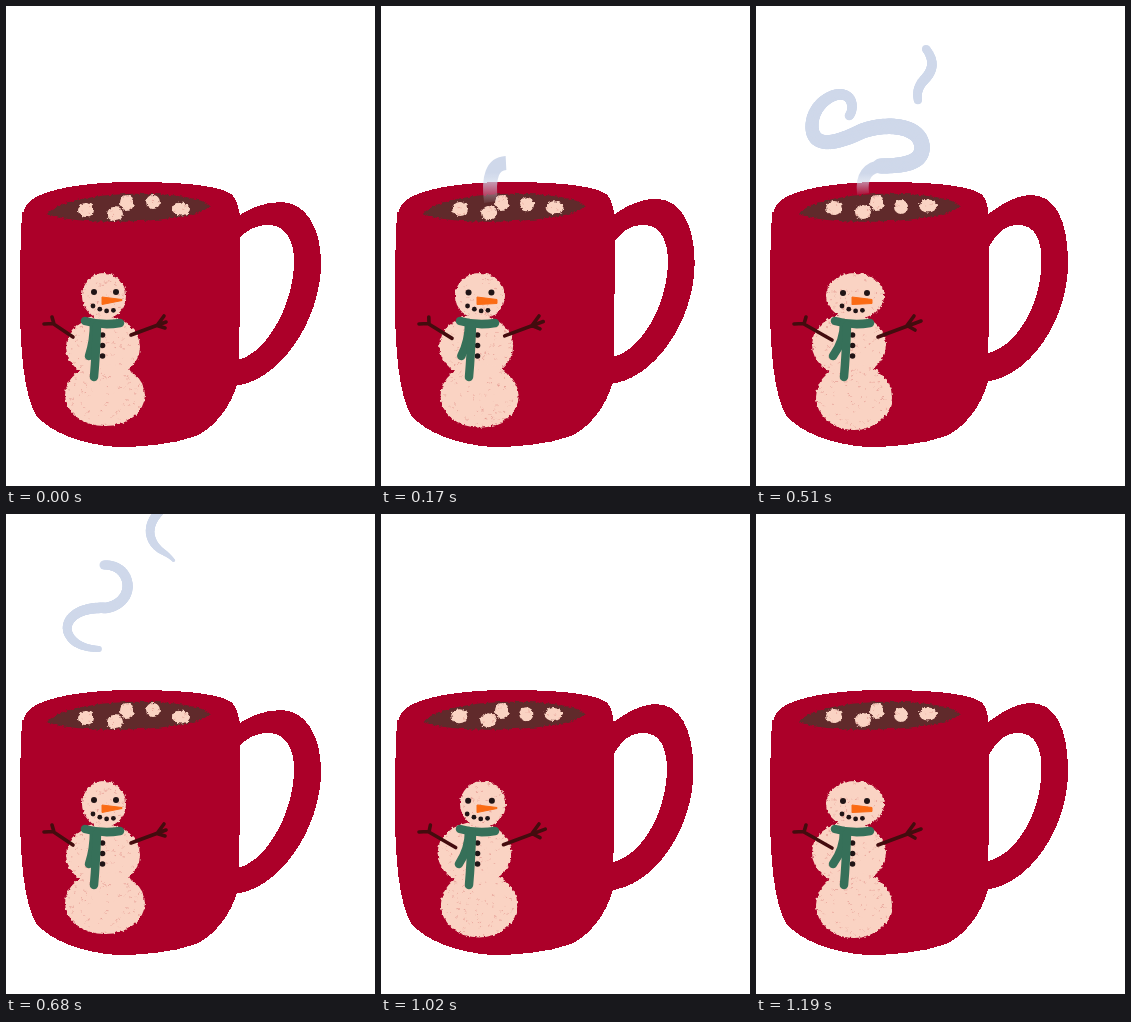
Write an HTML page that moves like this. It is 369 by 480 pixels and loops after 1360 ms.

```html
<!DOCTYPE html>
<html lang="en">
<head>
<meta charset="utf-8">
<title>Hot cocoa</title>
<style>
html, body { margin: 0; height: 100%; overflow: hidden; background: #fff; }
svg { display: block; width: 100vw; height: 100vh; }
.pose, .steam { opacity: 0; animation: pose 680ms step-end infinite; }
.steam { animation: steam 1360ms step-end infinite; }
@keyframes pose { 0% { opacity: 1 } 25%, 100% { opacity: 0 } }
@keyframes steam { 0% { opacity: 1 } 12.5%, 100% { opacity: 0 } }
.mug { fill: #ac0029; shape-rendering: crispEdges; }
.puff { fill: #cfd8ea; }
.base { fill: none; stroke: url(#fade); }
.cocoa { fill: #602a2b; }
.chalk { filter: url(#rough); }
.snow { fill: #fad3c3; }
.fleck { fill: none; stroke: #df8d85; stroke-linecap: round; opacity: .6; }
.coal { fill: #201416; }
.nose { fill: #fb6b14; stroke: #fb6b14; stroke-linejoin: round; }
.scarf { fill: none; stroke: #367059; stroke-width: 8.5; stroke-linecap: round; }
.twig { fill: none; stroke: #430c0e; stroke-width: 3.6; stroke-linecap: round; }
</style>
</head>
<body>
<svg viewBox="0 0 369 480">
  <defs>
    <linearGradient id="fade" x1="0" y1=".25" x2="0" y2="1">
      <stop offset="0" stop-color="#cfd8ea"/>
      <stop offset="1" stop-color="#cfd8ea" stop-opacity=".1"/>
    </linearGradient>
    <filter id="rough" color-interpolation-filters="sRGB">
      <feTurbulence type="fractalNoise" baseFrequency=".3" numOctaves="2" seed="4"/>
      <feDisplacementMap in="SourceGraphic" scale="4" xChannelSelector="R" yChannelSelector="G"/>
      <feGaussianBlur stdDeviation=".4"/>
    </filter>
  </defs>
  <g id="stage"></g>
</svg>
<script>
const STEP = 170;

// sway: how far the drawing leans from its resting pose
const poses = [
  { sway: 0, headX: 98, headR: 22, blunt: 1 },
  { sway: .45, headX: 99, headR: 25, blunt: 4 },
  { sway: .85, headX: 102, headR: 23, blunt: 1 },
  { sway: 1, headX: 99, headR: 29, blunt: 4 }
];

// Resting place, drift and radii
const mallows = [
  { x: 80, y: 204, dx: -2, dy: -2, rx: 8, ry: 7 },
  { x: 109, y: 208, dx: -2, dy: -2, rx: 8, ry: 7 },
  { x: 121, y: 197, dx: 0, dy: 0, rx: 7, ry: 8 },
  { x: 147, y: 196, dx: -2, dy: 5, rx: 7, ry: 7 },
  { x: 175, y: 203, dx: -3, dy: -3, rx: 9, ry: 6.5 }
];

const path = (cls, d, extra = '') => `<path class="${cls}" d="${d}" ${extra}/>`;
const oval = (cls, x, y, rx, ry = rx) =>
  `<ellipse class="${cls}" cx="${x}" cy="${y}" rx="${rx}" ry="${ry}"/>`;
const group = (cls, html, delay = 0) =>
  `<g class="${cls}" style="animation-delay:${delay}ms">${html}</g>`;

let seed = 11;
const rnd = () => (seed = seed * 16807 % 2147483647) / 2147483647;

function snowball(x, y, rx, ry) {
  let d = '';
  for (let i = 0; i < rx * ry / 18; i++) {
    const a = rnd() * Math.PI * 2, r = Math.sqrt(rnd()) * .95;
    d += `M${x + rx * r * Math.cos(a)} ${y + ry * r * Math.sin(a)}l${rnd() * 1.6} ${rnd() - .5}`;
  }
  return oval('snow', x, y, rx, ry) + path('fleck', d);
}

function mug(k) {
  const right = 234.5 - 1.5 * k, reach = 315 - 3 * k, hole = 288 - 2.5 * k;
  const top = 196 - 7 * k, low = 380 - 4 * k, end = 355 - 7 * k;
  const handle = `M226 ${216 - 3 * k}C238 203 258 ${top} 275 ${top}
    C299 ${top} ${reach} ${top + 25} ${reach} 257C${reach} 315 272 ${low - 2} 226 ${low}
    V${end}C258 ${end - 2} ${hole} 300 ${hole} 255
    C${hole} 236 280 219 263 219C252 219 240 222 226 ${240 + 15 * k}Z`;
  const body = `M18 206C18 186 70 176 128 176S215 181 225 188Q232 193 ${right} 214
    C${right} 255 ${right} 300 232 375C226 400 208 422 190 430C165 439 135 441 110 441
    C75 438 45 427 30 409C14 382 11 310 16 206Z`;
  return path('mug', handle) + path('mug', body);
}

function cocoa(k) {
  const x = 41 + 2 * k;
  return group('chalk',
    path('cocoa', `M${x} 208C62 182 190 183 204 200C190 217 72 221 ${x} 208Z`) +
    mallows.map(m => snowball(m.x + m.dx * k, m.y + m.dy * k, m.rx, m.ry)).join(''));
}

function snowman({ sway: k, headX, headR, blunt }) {
  const balls = snowball(headX, 290, headR, 23) +
    snowball(97 - 4 * k, 341 - 2 * k, 37, 31) +
    snowball(99 - k, 389 + 2 * k, 40 - 2 * k, 31 + 2 * k);
  const arms = `M${67 + 9 * k} ${331 + 3 * k}L47 317.5L38 318M48 318L${46 + 4 * k} 311
    M${125 - 3 * k} ${329 + 2 * k}L${160 + 5 * k} ${316 - k}
    M151 319.5L158 310M151 319.5L159 ${322 + 2 * k}`;
  let coal = oval('coal', 88 - k, 286 + k, 3) + oval('coal', 110 + k, 286 + k, 3);
  for (let i = 0; i < 3; i++) coal += oval('coal', 96.5, 329 + 10.5 * i, 2.8);
  for (let i = 0; i < 4; i++) coal += oval('coal', 87 + 6.8 * i - k, 300 + 5 * Math.sin(i * .7), 2.4);
  return group('chalk', balls) + path('twig', arms) + coal +
    path('nose', `M96 291L116 293.5V${293.5 + blunt}L96 298.5Z`) +
    path('scarf', 'M79 315Q96 320 114 317') +
    path('scarf', `M88 317Q88 335 ${83 - 6 * k} 350`) +
    path('scarf', 'M91 319Q90 348 88 371');
}

// Smoke trail: width runs from w0 to w1, with a swell in the middle
function wisp(d, w0, w1, swell) {
  const guide = document.createElementNS('http://www.w3.org/2000/svg', 'path');
  guide.setAttribute('d', d);
  const len = guide.getTotalLength();
  let out = '';
  for (let s = 0; s <= len; s += .8) {
    const t = s / len, { x, y } = guide.getPointAtLength(s);
    out += oval('puff', x.toFixed(1), y.toFixed(1), (w0 + (w1 - w0) * t + swell * Math.sin(Math.PI * t)) / 2);
  }
  return out;
}

const base = (d, w) => path('base', d, `stroke-width="${w}"`);

const steam = [
  base('M110 196Q105 158 125 157', 14),
  base('M110 196Q105 160 125 159', 15) +
    wisp('M122 160C150 162 173 160 173 145C173 118 125 120 94 149', 13, 6, 1),
  base('M107 188Q104 161 127 160', 12) +
    wisp('M124 160C150 160 166 156 166 142C166 118 128 116 104 126C82 137 56 144 56 120C56 92 94 76 96 100Q96 107 93 110', 15, 9, 3) +
    wisp('M170 43C180 56 176 66 168 74C161 82 161 88 162 95', 8, 8, 2),
  wisp('M98 51C126 50 132 88 100 94C70 92 56 108 63 121Q70 134 93 135', 9, 6, 3) +
    wisp('M153 -2C140 12 142 26 154 36Q164 42 168 47', 9, 3, 2),
  wisp('M82 32C84 50 98 50 108 55C122 62 122 78 108 90', 10, 3, 6) +
    wisp('M145 17C142 36 154 36 164 45C176 54 176 64 165 74', 8, 3, 5)
];

document.getElementById('stage').innerHTML =
  poses.map((p, i) => group('pose', mug(p.sway) + cocoa(p.sway) + snowman(p), i * STEP - 680)).join('') +
  steam.map((s, i) => group('steam', s, (i + 1) * STEP - 1360)).join('');
</script>
</body>
</html>
```
